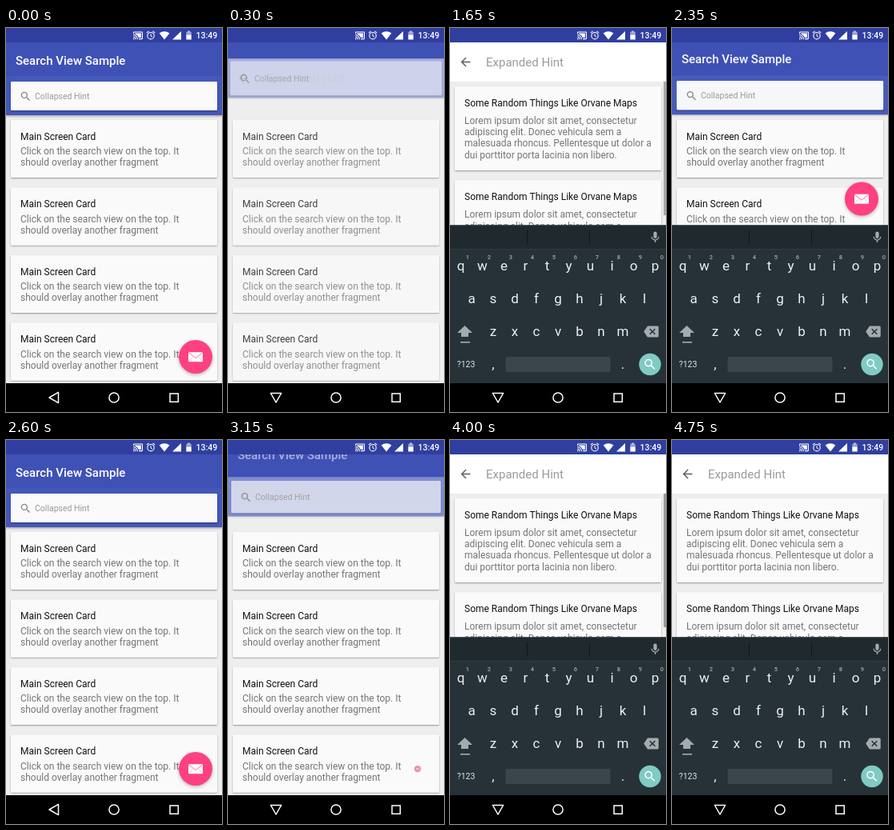
Recreate the animation shown at these times as an HTML page with a canvas. Size 270 by 480 pixels, loop 4.85 s.

```html
<!DOCTYPE html>
<html lang="en">
<head>
<meta charset="utf-8">
<title>Search view</title>
<style>
  html, body { margin: 0; width: 100%; height: 100%; overflow: hidden; background: #eee; }
  canvas { display: block; width: 100vw; height: 100vh; }
</style>
</head>
<body>
<canvas></canvas>
<script>
const LOOP = 4850, CYCLE = 2900, STEP = 50, W = 270, H = 480;
const canvas = document.querySelector('canvas');
const c = canvas.getContext('2d');
const k = window.devicePixelRatio || 1;
canvas.width = W * k;
canvas.height = H * k;

// Icons on a 24 unit grid
const icons = {
  search: 'M15.5 14h-.79l-.28-.27A6.47 6.47 0 0 0 16 9.5 6.5 6.5 0 1 0 9.5 16c1.61 0 3.09-.59 4.23-1.57l.27.28v.79l5 4.99L20.49 19zM9.5 14C7.01 14 5 11.99 5 9.5S7.01 5 9.5 5 14 7.01 14 9.5 11.99 14 9.5 14z',
  back: 'M20 11H7.83l5.59-5.59L12 4l-8 8 8 8 1.41-1.41L7.83 13H20z',
  mic: 'M12 14c1.66 0 3-1.34 3-3V5c0-1.66-1.34-3-3-3S9 3.34 9 5v6c0 1.66 1.34 3 3 3zM17.3 11c0 3-2.54 5.1-5.3 5.1S6.7 14 6.7 11H5c0 3.41 2.72 6.23 6 6.72V21h2v-3.28c3.28-.48 6-3.3 6-6.72z',
  erase: 'M22 3H7c-.69 0-1.23.35-1.59.88L0 12l5.41 8.11c.36.53.9.89 1.59.89h15c1.1 0 2-.9 2-2V5c0-1.1-.9-2-2-2zM19 15.59L17.59 17 14 13.41 10.41 17 9 15.59 12.59 12 9 8.41 10.41 7 14 10.59 17.59 7 19 8.41 15.41 12z',
  cast: 'M1 18v3h3c0-1.66-1.34-3-3-3zm0-4v2c2.76 0 5 2.24 5 5h2c0-3.87-3.13-7-7-7zm18-7H5v1.63c3.96 1.28 7.09 4.41 8.37 8.37H19V7zM1 10v2c4.97 0 9 4.03 9 9h2c0-6.08-4.93-11-11-11zm20-7H3c-1.1 0-2 .9-2 2v3h2V5h18v14h-7v2h7c1.1 0 2-.9 2-2V5c0-1.1-.9-2-2-2z',
};
for (const name in icons) icons[name] = new Path2D(icons[name]);

const clamp = v => Math.max(0, Math.min(1, v));
const ramp = (t, from, to) => clamp((t - from) / (to - from));
const ease = p => 0.5 - 0.5 * Math.cos(Math.PI * p);
const mix = (a, b, p) => a + (b - a) * p;

function group(alpha, draw) {
  if (alpha <= 0) return;
  c.save();
  c.globalAlpha *= alpha;
  draw();
  c.restore();
}

function rect(x, y, w, h, color) {
  c.fillStyle = color;
  c.fillRect(x, y, w, h);
}

function text(str, x, y, size, color, weight = 400, align = 'left') {
  c.font = `${weight} ${size}px Roboto, sans-serif`;
  c.textAlign = align;
  c.fillStyle = color;
  c.fillText(str, x, y);
}

function icon(name, cx, cy, size, color) {
  c.save();
  c.translate(cx - size / 2, cy - size / 2);
  c.scale(size / 24, size / 24);
  c.fillStyle = color;
  c.fill(icons[name], 'evenodd');
  c.restore();
}

function poly(points, color) {
  c.beginPath();
  points.forEach(([x, y]) => c.lineTo(x, y));
  c.closePath();
  c.fillStyle = color;
  c.fill();
}

function line(points, color, width) {
  c.beginPath();
  points.forEach(([x, y]) => c.lineTo(x, y));
  c.strokeStyle = color;
  c.lineWidth = width;
  c.stroke();
}

function disc(x, y, r, color) {
  c.beginPath();
  c.arc(x, y, r, 0, 7);
  c.fillStyle = color;
  c.fill();
}

function shadow(blur, dy, alpha) {
  c.shadowColor = `rgba(0,0,0,${alpha})`;
  c.shadowBlur = blur * k;
  c.shadowOffsetY = dy * k;
}

// The shadow stays outside the shape, so a translucent panel is not darkened.
function panel(x, y, w, h, color) {
  const shape = new Path2D(), outside = new Path2D();
  shape.roundRect(x, y, w, h, 1.5);
  outside.rect(0, 0, W, H);
  outside.addPath(shape);
  c.fillStyle = color;
  c.save();
  c.clip(outside, 'evenodd');
  shadow(2, 1, 0.38);
  c.fill(shape);
  c.restore();
  c.fill(shape);
}

function card(y, h, bodyTop, title, lines) {
  panel(6, y, 258, h, '#fafafa');
  text(title, 18, y + 24.5, 12, '#111');
  lines.forEach((str, i) => text(str, 18, y + bodyTop + i * 14.2, 12, '#757575'));
}

function mainCards() {
  for (let i = 0; i < 4; i++) {
    card(115 + i * 84.5, 72, 43, 'Main Screen Card',
      ['Click on the search view on the top. It', 'should overlay another fragment']);
  }
}

function resultCards(barAlpha) {
  for (let i = 0; i < 2; i++) {
    card(73 + i * 117.3, 105, 47, 'Some Random Things Like Orvane Maps', [
      'Lorem ipsum dolor sit amet, consectetur',
      'adipiscing elit. Donec vehicula sem a',
      'malesuada rhoncus. Pellentesque ut dolor a',
      'dui porttitor porta lacinia non libero.']);
  }
  group(barAlpha, () => rect(267, 67, 3, 167, '#999'));
}

function header(e, cursor) {
  const lift = 42 * e, top = 60 - lift;
  c.save();
  shadow(3, 1, 0.4 * (1 - e));
  rect(0, 0, W, 109 - lift, '#3f51b5');
  c.restore();
  group(1 - 1.4 * e, () => text('Search View Sample', 12, 45.5 - 65 * e, 15, '#fff', 500));
  group(1 - e, () => rect(0, top, W, 49, 'rgba(80,105,195,.3)'));
  group(e, () => {
    rect(0, top, W, 49, '#fff');
    icon('back', 19.5, top + 24.5, 18, '#616161');
    text('Expanded Hint', 45 + 7 * (1 - e), top + 29.5, 15, '#9a9a9a');
  });
  group(1 - e, () => {
    const x = mix(6, 0, e), y = mix(67, 18, e);
    panel(x, y, W - 2 * x, mix(103, 67, e) - y, '#fafafa');
  });
  group(1 - e * e, () => {
    icon('search', 24.5 - 6 * e, 85.5 - lift, 15.5, '#858585');
    text('Collapsed Hint', 36 - 6 * e, 89 - lift, 10.5, '#9a9a9a');
  });
  if (cursor) rect(45, 33.5, 1.3, 18.5, '#a04060');
}

function statusBar() {
  const white = '#fff';
  rect(0, 0, W, 18, '#303f9f');
  icon('cast', 165, 9.3, 13, white);
  // Alarm
  c.strokeStyle = white;
  c.lineWidth = 1.1;
  c.beginPath();
  c.arc(181, 9.7, 4.2, 0, 7);
  c.stroke();
  line([[181, 7.2], [181, 10], [183, 11.2]], white, 1);
  line([[175.8, 6.2], [178.6, 3.9]], white, 1.1);
  line([[183.4, 3.9], [186.2, 6.2]], white, 1.1);
  // Wi-Fi, signal, battery
  c.beginPath();
  c.moveTo(198, 14.5);
  c.lineTo(191.6, 6.6);
  c.quadraticCurveTo(198, 1.8, 204.4, 6.6);
  c.fillStyle = white;
  c.fill();
  poly([[219, 4], [219, 14.5], [208, 14.5]], white);
  rect(227, 3.5, 3, 2, 'rgba(255,255,255,.6)');
  rect(225.3, 4.8, 6.4, 4, 'rgba(255,255,255,.5)');
  rect(225.3, 8.5, 6.4, 6, white);
  text('13:49', 237.5, 13.3, 10.5, white, 500);
}

function fab(y, scale) {
  group(clamp(scale + 0.3), () => {
    c.translate(237, y);
    c.scale(scale, scale);
    c.save();
    shadow(4 * scale, 1.5 * scale, 0.28);
    disc(0, 0, 21, '#ff4081');
    c.restore();
    rect(-9, -5.8, 18, 12, '#fff');
    line([[-9, -5.5], [0, 1.6], [9, -5.5]], '#ff6c9d', 1);
    line([[-9, 6], [-3, -0.4]], '#e3c3cf', 0.9);
    line([[9, 6], [3, -0.4]], '#e3c3cf', 0.9);
  });
}

function keyRow(keys, x, y) {
  [...keys].forEach((key, i) => text(key, x + 27 * i, y, 17, '#eceff1', 400, 'center'));
}

function keyboard(offset) {
  c.save();
  c.translate(0, offset);
  rect(0, 246.5, W, 233, '#263238');
  rect(0, 246.5, W, 29.5, '#20292e');
  rect(0, 276, W, 1, '#2f3b41');
  for (const x of [96, 174]) rect(x, 253, 1, 18, '#11181b');
  icon('mic', 256.5, 261.5, 17, '#a3abaf');
  keyRow('qwertyuiop', 13.5, 303);
  [...'1234567890'].forEach((d, i) => text(d, 22 + 27 * i, 288.5, 7.5, '#a3abaf', 500, 'center'));
  keyRow('asdfghjkl', 27, 344);
  keyRow('zxcvbnm', 54, 385);
  const dim = '#a3abaf';
  poly([[18.5, 372], [28, 381], [23, 381], [23, 386], [14, 386], [14, 381], [9, 381]], dim);
  rect(13, 392, 12, 1.6, dim);
  icon('erase', 251.5, 379.5, 18.5, dim);
  text('?123', 20, 424, 10.5, '#dfe3e5', 400, 'center');
  text(',', 54, 426, 17, '#eceff1', 400, 'center');
  text('.', 216, 426, 17, '#eceff1', 400, 'center');
  c.beginPath();
  c.roundRect(69.5, 411, 131, 19, 2);
  c.fillStyle = '#3b464c';
  c.fill();
  disc(250, 420.5, 13.7, '#80cbc4');
  icon('search', 250, 420.5, 18, '#fff');
  c.restore();
}

function navBar(turn) {
  rect(0, 444, W, 36, '#000');
  c.save();
  c.translate(60, 462);
  c.rotate(-turn * Math.PI / 2);
  c.lineJoin = 'round';
  line([[-6, 0], [5.5, -6.6], [5.5, 6.6], [-6, 0], [5.5, -6.6]], '#fff', 1.5);
  c.restore();
  c.beginPath();
  c.arc(135, 462, 6.1, 0, 7);
  c.strokeStyle = '#fff';
  c.lineWidth = 1.5;
  c.stroke();
  c.strokeRect(205, 457, 10.3, 10.3);
}

// Opens from u = 95, closes from u = 1950; the second run ends before closing.
function draw(time) {
  const u = time % CYCLE;
  const e = ease(ramp(u, 95, 495)) * (1 - ease(ramp(u, 1985, 2385)));
  const closing = ramp(u, 1950, 2250);
  const mainAlpha = Math.max(1 - ramp(u, 250, 500), closing);
  const resultAlpha = ramp(u, 500, 750) * (1 - closing);
  const barAlpha = 1 - ramp(u, 1600, 1850);
  const rise = 1 - (1 - ramp(u, 300, 500)) ** 2;
  const fall = ramp(u, 2450, 2600) ** 3;
  const turn = ramp(u, 100, 250) - ramp(u, 2450, 2600);
  const fabScale = u < 1950 ? 1 - ramp(u, 80, 290) : 1 - (1 - ramp(u, 2150, 2350)) ** 2;
  const fabY = u >= 2150 && u < 2450 ? 213.5 : 411;

  c.setTransform(canvas.width / W, 0, 0, canvas.height / H, 0, 0);
  rect(0, 0, W, H, '#eee');
  group(mainAlpha, mainCards);
  group(resultAlpha, () => resultCards(barAlpha));
  header(e, u >= 500 && u < 1100);
  statusBar();
  if (fabScale > 0) fab(fabY, fabScale);
  if (rise > 0 && fall < 1) keyboard(197 * (1 - rise + fall));
  navBar(turn);
}

const begin = performance.now();
function tick() {
  const time = (performance.now() - begin) % LOOP;
  draw(Math.floor(time / STEP) * STEP);
  requestAnimationFrame(tick);
}
tick();
</script>
</body>
</html>
```
